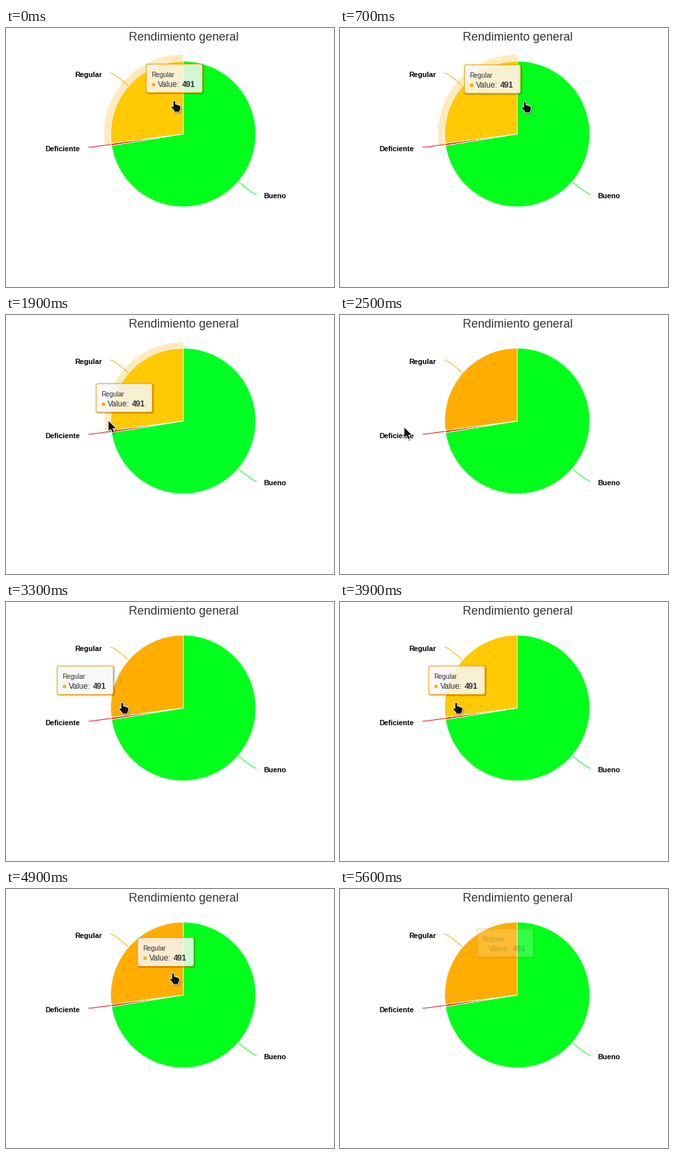
A matplotlib script that plays this animation: 497 by 391 pixels, repeating every 5700 ms.

```python
import numpy as np
import matplotlib.pyplot as plt
from matplotlib.animation import FuncAnimation
from matplotlib.patches import Circle, FancyBboxPatch, PathPatch, Polygon, Wedge
from matplotlib.path import Path

W, H, DPI = 497, 391, 64
STEP, LOOP = 100, 5700
PX = 72 / DPI  # points per pixel
CENTER, RADIUS = (268.5, 160), 110

plt.rcParams["font.family"] = "Liberation Sans"
plt.rcParams["text.hinting"] = "force_autohint"

NAMES = ["Bueno", "Deficiente", "Regular"]
VALUES = np.array([1314, 8, 491])
EDGES = -90 + 360 * np.insert(np.cumsum(VALUES), 0, 0) / VALUES.sum()
BASE = {"Bueno": (0, 255, 27), "Deficiente": (255, 0, 0), "Regular": (255, 173, 0)}
LIT = {"Bueno": (0, 255, 40), "Deficiente": (255, 25, 25), "Regular": (255, 201, 4)}

# The picture only refreshes at these moments (ms).
TICKS = np.array([0, 300, *range(500, 1300, 100), *range(1500, 2600, 100), 3300,
                  3500, 3600, 3900, 4100, 4300, 4600, 4700, 4900, 5000, 5300, 5600])

# Tracks: rows of (ms, value...), linear in between.
POINTER = [(0, 255, 110), (300, 366, 181), (500, 240, 112), (600, 231, 111),
           (700, 280, 111), (800, 310, 116), (1000, 321, 121), (1200, 321, 121),
           (1500, 321, 128), (2000, 114, 168), (2500, 97.5, 170),
           (3300, 176, 152), (4700, 176, 152), (4900, 253, 127), (5000, 292, 94)]
TIP = [(0, 212, 54), (300, 191, 54), (600, 188, 55), (700, 188, 55), (800, 222, 58),
       (900, 256, 63), (1000, 276, 65), (1200, 276, 65), (1500, 275, 67),
       (1600, 262, 75), (1700, 226, 88), (1800, 172, 98), (1900, 136, 103),
       (2000, 115, 105), (2500, 115, 105), (3300, 77, 96), (3500, 134, 96),
       (4700, 134, 96), (4900, 199, 73), (5000, 208, 57), (5300, 207, 59)]
TIP_ALPHA = [(2000, 1), (2500, 0), (3300, 1), (5000, 1), (5300, .65), (5600, .24)]
GLOW = {
    "Regular": [(1000, 1), (1200, 0), (1600, 0), (1800, 1), (2000, 1), (2300, 0),
                (3300, 0), (3600, 1), (3900, 1), (4100, .75), (4700, .15), (4900, 0)],
    "Bueno": [(700, 0), (900, 1), (1600, 1), (2500, 0)],
}
HALO = {
    "Regular": [(700, 10), (900, 0), (1600, 0), (1800, 10), (2000, 8), (2200, 0),
                (3300, 0), (3500, 10), (3600, 10), (3900, 0), (4100, 2.5),
                (4300, 7.5), (4700, 3), (4900, 0)],
    "Bueno": [(700, 0), (900, 10), (1600, 10), (1800, 0)],
}

HAND = [(-1.3, 1), (-.6, .2), (.6, .2), (1.3, 1), (1.6, 5.6), (3.4, 5.4), (4.3, 6.3),
        (6.2, 6.2), (7, 7.2), (8.6, 7.4), (9.4, 8.6), (9.2, 12), (8, 14.6), (8, 16.5),
        (.4, 16.5), (0, 14.8), (-2.8, 11.6), (-4.4, 9.2), (-3.6, 8), (-1.4, 9.6)]
ARROW = [(0, 0), (0, 15), (3.4, 11.9), (5.8, 17.4), (8.3, 16.3), (6, 11), (10.8, 10.8)]

fig = plt.figure(figsize=(W / DPI, H / DPI), dpi=DPI, facecolor="white")
ax = fig.add_axes([0, 0, 1, 1])
ax.set(xlim=(0, W), ylim=(H, 0))
ax.axis("off")


def track(rows, t):
    times, *cols = zip(*rows)
    vals = [float(np.interp(t, times, c)) for c in cols]
    return vals if len(vals) > 1 else vals[0]


def color(name, lit=0.0):
    return tuple((np.array(BASE[name]) * (1 - lit) + np.array(LIT[name]) * lit) / 255)


def text(x, y, s, size, **kw):
    return ax.text(x, y, s, fontsize=size * PX, va="baseline", **kw)


def connector(name, start, c1, c2, end):
    path = Path([start, c1, c2, end], [Path.MOVETO] + [Path.CURVE4] * 3)
    ax.add_patch(PathPatch(path, fc="none", ec=color(name), lw=PX, zorder=1))


text(269, 19, "Rendimiento general", 18, color="#333333", ha="center")
for label, x, y, ha in (("Regular", 146, 74, "right"), ("Deficiente", 112.5, 186, "right"),
                        ("Bueno", 390, 257, "left")):
    text(x, y, label, 11, weight="bold", color="black", ha=ha, zorder=4)
connector("Regular", (158, 68), (163, 68), (175, 78), (186, 88))
connector("Deficiente", (125, 180), (130, 180), (149, 177), (161, 175.5))
connector("Bueno", (380, 251), (375, 251), (363, 241), (352, 232))

halos, slices = {}, {}
for name, a, b in zip(NAMES, EDGES, EDGES[1:]):
    halos[name] = ax.add_patch(Wedge(CENTER, RADIUS, a, b, fc=color(name), ec="none",
                                     alpha=.25, zorder=0))
    slices[name] = ax.add_patch(Wedge(CENTER, RADIUS, a, b, fc=color(name), ec="white",
                                      lw=PX, joinstyle="round", zorder=2))
moving = []


def add(patch):
    moving.append(ax.add_patch(patch))


def draw_tip(name, x, y, alpha):
    width = 95 if name == "Bueno" else 85

    def box(shift, **kw):
        add(FancyBboxPatch((x + .5 + shift, y + .5 + shift), width, 43,
                           boxstyle="round,pad=0,rounding_size=3", zorder=5, **kw))

    for lw, shade in ((5, .05), (3, .1), (1, .15)):
        box(1, fc="none", ec=(0, 0, 0, shade * alpha), lw=lw * PX)
    box(0, fc=(.97, .97, .97, .85 * alpha), ec=(*color(name), alpha), lw=PX)
    add(Circle((x + 11.6, y + 31.5), 2.7, fc=color(name), ec="none", alpha=alpha, zorder=6))

    value = f"{VALUES[NAMES.index(name)]:,}".replace(",", " ")
    style = dict(color="#333333", alpha=alpha, zorder=6)
    moving.extend([text(x + 8, y + 20, name, 10, **style),
                   text(x + 18.4, y + 35, "Value:", 12, **style),
                   text(x + 55, y + 35, value, 12, weight="bold", **style)])


def draw_pointer(shape, x, y):
    pts = np.array(shape) + (x, y)
    for lw, shade in ((4, .08), (2, .16)):
        add(Polygon(pts + (1, 1.5), fc=(0, 0, 0, shade), ec=(0, 0, 0, shade),
                    lw=lw * PX, joinstyle="round", zorder=7))
    add(Polygon(pts, fc="none", ec="white", lw=2 * PX, joinstyle="round", zorder=8))
    add(Polygon(pts, fc="#111111", ec="none", zorder=9))


def update(i):
    t = TICKS[TICKS <= i * STEP][-1]
    while moving:
        moving.pop().remove()

    for name in NAMES:
        size = track(HALO[name], t) if name in HALO else 0
        halos[name].set_radius(RADIUS + size)
        halos[name].set_visible(size > 0)
        if name in GLOW:
            slices[name].set_facecolor(color(name, track(GLOW[name], t)))

    alpha = track(TIP_ALPHA, t)
    if alpha > 0:
        x, y = np.round(track(TIP, t))
        draw_tip("Bueno" if 800 <= t < 1700 else "Regular", x, y, alpha)
    if t < 5300:
        draw_pointer(ARROW if 1900 <= t < 3300 else HAND, *track(POINTER, t))
    return []


anim = FuncAnimation(fig, update, frames=LOOP // STEP, interval=STEP,
                     repeat=True, repeat_delay=0, blit=False)
plt.show()
```
